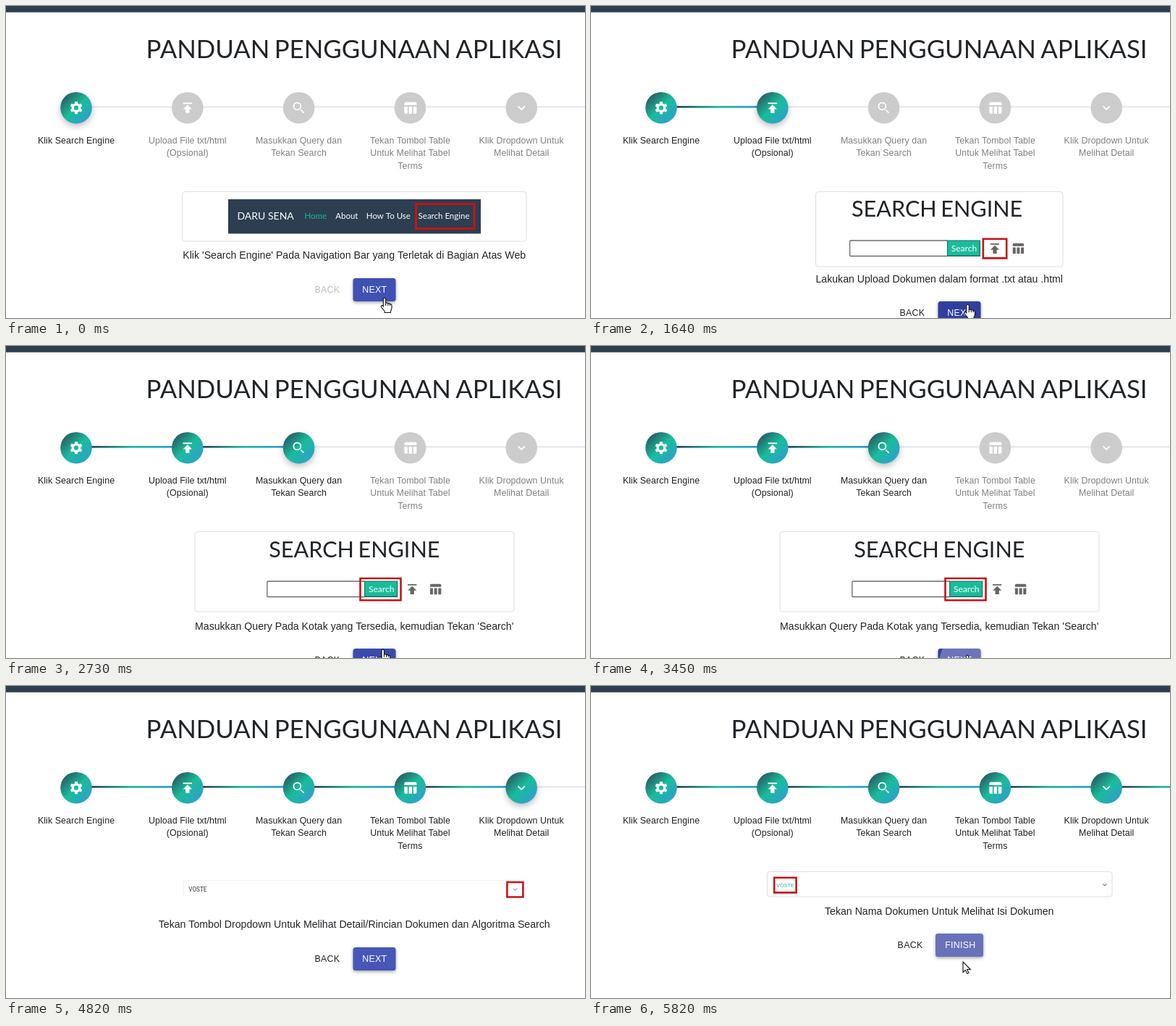
An HTML page with a canvas that plays this animation: 800x431 px, repeating every 5.91 s.

```html
<!DOCTYPE html>
<html lang="id">
<head>
<meta charset="utf-8">
<title>Panduan Penggunaan Aplikasi</title>
<style>
html, body { margin: 0; width: 100%; height: 100%; overflow: hidden; background: #fff; }
canvas { display: block; }
</style>
</head>
<body>
<canvas id="stage" width="800" height="431"></canvas>
<script>
const ctx = document.getElementById('stage').getContext('2d');
const LOOP = 5910;
const SANS = '"Liberation Sans", Arial, sans-serif';
const LATO = 'Lato, sans-serif';
const NAVY = '#2c3e50', TEAL = '#1abc9c', BLUE = '#3498db', RED = '#c41418';
const BRAND = 'DARU SENA', DOC = 'VOSTE';

const ICONS = {
  publish: new Path2D('M5 4v2h14V4H5zm0 10h4v6h6v-6h4l-7-7-7 7z'),
  table: new Path2D('M10 10h5v11h-5zM17 21h3c1.1 0 2-.9 2-2v-9h-5v11zm3-18H5c-1.1 0-2 .9-2 2v3h19V5c0-1.1-.9-2-2-2zM3 19c0 1.1.9 2 2 2h3V10H3v9z'),
  expand: new Path2D('M16.6 8.6 12 13.2 7.4 8.6 6 10l6 6 6-6z'),
  gear: gearPath(),
  search: searchPath()
};
const ARROW = new Path2D('M0 0V14.5L3.4 11.4 5.6 16.4 7.9 15.4 5.7 10.5H10.3Z');
const HAND = new Path2D('M-1.7 12V1.6Q0-1.4 1.7 1.6V7.5Q3.4 6.2 4.8 8Q6.4 7 7.6 8.8Q9.6 8.4 10 10.5V14Q9.8 16.5 8.4 18.5V20.5H0V18.5L-4.6 12.8Q-5.2 10.2-3 10.6Z');

const STEPS = [
  ['gear', 'Klik Search Engine'],
  ['publish', 'Upload File txt/html', '(Opsional)'],
  ['search', 'Masukkan Query dan', 'Tekan Search'],
  ['table', 'Tekan Tombol Table', 'Untuk Melihat Tabel', 'Terms'],
  ['expand', 'Klik Dropdown Untuk', 'Melihat Detail']
];

const QUERY = "Masukkan Query Pada Kotak yang Tersedia, kemudian Tekan 'Search'";
const PUBLISH_BOX = [541.8, 321.8, 32.4, 26.6];
const VIEWS = [
  { at: 0, step: 0, panel: [243.5, 719, 325], base: 349, top: 376, draw: navBar,
    text: "Klik 'Search Engine' Pada Navigation Bar yang Terletak di Bagian Atas Web" },
  { at: 730, step: 1, panel: [310.5, 652, 360], base: 382, top: 408,
    draw: () => searchForm(0, 0, PUBLISH_BOX),
    text: 'Lakukan Upload Dokumen dalam format .txt atau .html' },
  { at: 2180, step: 2, panel: [261, 702, 363], base: 388, top: 414.5,
    draw: () => searchForm(0, 2, PUBLISH_BOX), text: QUERY },
  { at: 2360, step: 2, panel: [261, 702, 367], base: 392, top: 418,
    draw: () => searchForm(3.2, 1, [489.5 - 3.2, 320, 56, 30.2]), text: QUERY },
  { at: 3550, step: 3, panel: [109.5, 853, 383], base: 414, top: 441, left: 109.2,
    draw: () => searchForm(-.8, 11, [573.6, 321, 33, 28.2]),
    text: "Setelah Memasukkan Query dan Menekan 'Search', Maka Tabel Terms Dapat Dilihat Dengan Menekan Tombol Table" },
  { at: 4450, step: 4, base: 334, top: 361, draw: dropdownRow,
    text: 'Tekan Tombol Dropdown Untuk Melihat Detail/Rincian Dokumen dan Algoritma Search' },
  { at: 5730, step: 5, panel: [243.5, 720, 291], base: 316, top: 342, draw: documentRow, finish: true,
    text: 'Tekan Nama Dokumen Untuk Melihat Isi Dokumen' }
];

const HOVER = [[0, 0], [90, .4], [270, 1], [880, 1], [1180, 0], [1400, 0], [1640, 1],
  [2300, 1], [2550, 0], [2640, 0], [2900, 1], [4000, 1], [4450, 0], [5090, 0], [5340, 1]];
const CURSOR_X = [[0, 523], [89, 523], [90, 519], [730, 518.5], [1270, 518.5], [1730, 521],
  [2640, 521], [3000, 520], [3910, 520], [5090, 516], [5450, 514]];
const CURSOR_Y = [[0, 403], [89, 403], [90, 396], [1270, 396], [1730, 416],
  [2640, 416], [3000, 427], [3910, 427], [5090, 389], [5450, 381]];
const PRESSES = [640, 2070, 3270, 4300, 5480];

function track(keys, t) {
  const i = keys.findIndex(k => k[0] > t);
  if (i < 0) return keys[keys.length - 1][1];
  const [t0, a] = keys[i - 1], [t1, b] = keys[i];
  return a + (b - a) * (t - t0) / (t1 - t0);
}

function gearPath() {
  const p = new Path2D();
  const at = (deg, r) => p.lineTo(12 + r * Math.cos(deg * Math.PI / 180), 12 + r * Math.sin(deg * Math.PI / 180));
  for (let a = -90; a < 270; a += 60) {
    at(a - 19, 7.2); at(a - 12, 9.8); at(a + 12, 9.8); at(a + 19, 7.2);
  }
  p.closePath();
  p.moveTo(15.5, 12);
  p.arc(12, 12, 3.5, 0, 7);
  return p;
}

function searchPath() {
  const p = new Path2D('M14.2 15.6 15.6 14.2 20.5 19 19 20.5Z');
  p.moveTo(16, 9.5);
  p.arc(9.5, 9.5, 6.5, 0, Math.PI * 2);
  p.moveTo(14, 9.5);
  p.arc(9.5, 9.5, 4.5, 0, Math.PI * 2);
  return p;
}

function icon(name, x, y, size, color) {
  ctx.save();
  ctx.translate(x, y);
  ctx.scale(size / 24, size / 24);
  ctx.translate(-12, -12);
  ctx.fillStyle = color;
  ctx.fill(ICONS[name], 'evenodd');
  ctx.restore();
}

function text(str, x, y, size, color, { font = SANS, align = 'left', gap = 0, wordGap = 0 } = {}) {
  ctx.font = `${size}px ${font}`;
  ctx.letterSpacing = gap + 'px';
  ctx.wordSpacing = wordGap + 'px';
  ctx.textAlign = align;
  ctx.fillStyle = color;
  ctx.fillText(str, x, y);
}

function heading(str, x, y, size, align) {
  text(str, x, y, size, '#212529', { font: LATO, align, wordGap: -.075 * size });
}

function box(x, y, w, h, color) {
  ctx.fillStyle = color;
  ctx.fillRect(x, y, w, h);
}

function frame(x, y, w, h, color, width, radius = 0) {
  ctx.beginPath();
  ctx.roundRect(x, y, w, h, radius);
  ctx.strokeStyle = color;
  ctx.lineWidth = width;
  ctx.stroke();
}

function shadow(alpha, blur, dy) {
  ctx.shadowColor = `rgba(0,0,0,${alpha})`;
  ctx.shadowBlur = blur;
  ctx.shadowOffsetY = dy;
}

function blend(x0, y0, x1, y1) {
  const g = ctx.createLinearGradient(x0, y0, x1, y1);
  [NAVY, TEAL, BLUE].forEach((c, i) => g.addColorStop(i / 2, c));
  return g;
}

function stepper(step) {
  const cx = i => 97 + 153.8 * i, cy = 140.7;
  for (let i = 1; i <= STEPS.length; i++) {
    const x0 = cx(i - 1) + 17.7, x1 = cx(i) - 17.7;
    box(x0, 138, x1 - x0, 2.7, step >= i ? blend(x0, 0, x1, 0) : '#eaeaf0');
  }
  STEPS.forEach(([name, ...lines], i) => {
    const x = cx(i), on = i <= step;
    ctx.save();
    if (i === step) shadow(.25, 9, 3.6);
    ctx.beginPath();
    ctx.arc(x, cy, 21.8, 0, 7);
    ctx.fillStyle = on ? blend(x - 21.6, cy - 22.3, x + 21.6, cy + 22.3) : '#ccc';
    ctx.fill();
    ctx.restore();
    icon(name, x, cy, 21.5, '#fff');
    lines.forEach((line, k) => text(line, x, 189.6 + 17.6 * k, 12.37,
      on ? '#212121' : '#808080', { align: 'center', gap: .1 }));
  });
}

function navBar() {
  const lato = { font: LATO };
  box(307, 267, 349, 47.5, NAVY);
  text(BRAND, 319.5, 294.5, 14, '#fff', lato);
  text('Home', 412.4, 294, 11.5, TEAL, lato);
  text('About', 455.2, 294, 11.5, '#fff', lato);
  text('How To Use', 497.8, 294, 11.5, '#fff', lato);
  text('Search Engine', 569.6, 294, 11.5, '#fff', lato);
  frame(566.5, 273.5, 80.5, 34, RED, 3);
}

function searchForm(dx, dy, mark) {
  ctx.save();
  ctx.translate(dx, dy);
  heading('SEARCH ENGINE', 360, 291, 30.6, 'left');
  frame(357.6, 324, 135, 21.5, '#6b6b6b', 1.3, 1);
  box(492, 323.5, 46, 22.5, '#17705f');
  box(493, 324.5, 43.8, 20, TEAL);
  text('Search', 497.8, 339.2, 12, '#fff', { font: LATO });
  icon('publish', 558, 335, 21, '#666');
  icon('table', 590, 335, 19.5, '#666');
  frame(...mark, RED, 2.6);
  ctx.restore();
}

function dropdownRow() {
  box(245, 268, 470, 1, '#f1f1f1');
  box(245, 268, 1, 24, '#f1f1f1');
  text(DOC, 252.3, 284, 8.2, '#333', { font: 'Roboto, sans-serif' });
  icon('expand', 703.5, 281, 11, '#777');
  frame(692.4, 271, 22, 20.5, RED, 2.6);
}

function documentRow() {
  text(DOC, 256, 278, 8, '#45b5a5', { font: 'Roboto, sans-serif' });
  icon('expand', 710, 274.7, 12, '#777');
  frame(253.2, 264.8, 30.4, 20.6, RED, 2.6);
}

function buttons(view, t) {
  const { top, finish, step } = view;
  const x = finish ? 476 : 479.5, w = finish ? 66 : 59, h = 32;
  const base = top + 20.4;
  text('BACK', finish ? 423.6 : 426.4, base, 12.37, step ? '#212121' : '#bdbdbd', { gap: .35 });

  const k = track(HOVER, t);
  ctx.save();
  shadow(.36, 4, 1.8);
  ctx.beginPath();
  ctx.roundRect(x, top, w, h, 3.5);
  ctx.fillStyle = `rgb(${63 - 15 * k},${81 - 18 * k},${181 - 22 * k})`;
  ctx.fill();
  ctx.restore();

  const age = t - PRESSES.filter(p => p <= t).pop();
  if (age < 550) {
    const grow = 1 - (1 - Math.min(age / 400, 1)) ** 2;
    const fade = Math.min(1, (550 - age) / 220);
    ctx.save();
    ctx.beginPath();
    ctx.roundRect(x, top, w, h, 3.5);
    ctx.clip();
    ctx.beginPath();
    ctx.arc(520, top + 18, 55 * grow, 0, 7);
    ctx.fillStyle = `rgba(255,255,255,${.28 * fade})`;
    ctx.fill();
    ctx.restore();
  }
  text(finish ? 'FINISH' : 'NEXT', finish ? 489.2 : 492.3, base, 12.37, '#fff', { gap: .3 });
}

function cursor(view, t) {
  if (t >= 3910 && t < 5090) return;
  const x = track(CURSOR_X, t), y = track(CURSOR_Y, t);
  const over = y >= view.top && y <= view.top + 32 && !(t >= 2180 && t < 2640);
  const shape = over || t > 3000 && t < 3910 ? HAND : ARROW;
  ctx.save();
  ctx.translate(x, y);
  ctx.fillStyle = '#fff';
  ctx.strokeStyle = '#111';
  ctx.lineWidth = 1.1;
  ctx.fill(shape);
  ctx.stroke(shape);
  if (shape === HAND) {
    ctx.beginPath();
    for (const lx of [1.7, 4.8, 7.6]) {
      ctx.moveTo(lx, 8);
      ctx.lineTo(lx, 11);
    }
    ctx.stroke();
  }
  ctx.restore();
}

function draw(t) {
  const view = VIEWS.filter(v => v.at <= t).pop();
  box(0, 0, 800, 431, '#fff');
  box(0, 0, 800, 8.7, NAVY);
  heading('PANDUAN PENGGUNAAN APLIKASI', 481, 71.5, 34.8, 'center');
  stepper(view.step);
  if (view.panel) {
    const [x0, x1, bottom] = view.panel;
    frame(x0, 256.5, x1 - x0, bottom - 256.5, '#dfdfdf', 1, 3.5);
  }
  view.draw();
  text(view.text, view.left ?? 481.2, view.base, 14.14, '#212529', { align: view.left ? 'left' : 'center' });
  buttons(view, t);
  cursor(view, t);
}

const start = performance.now();
function tick() {
  draw((performance.now() - start) % LOOP);
  requestAnimationFrame(tick);
}
tick();
</script>
</body>
</html>
```
